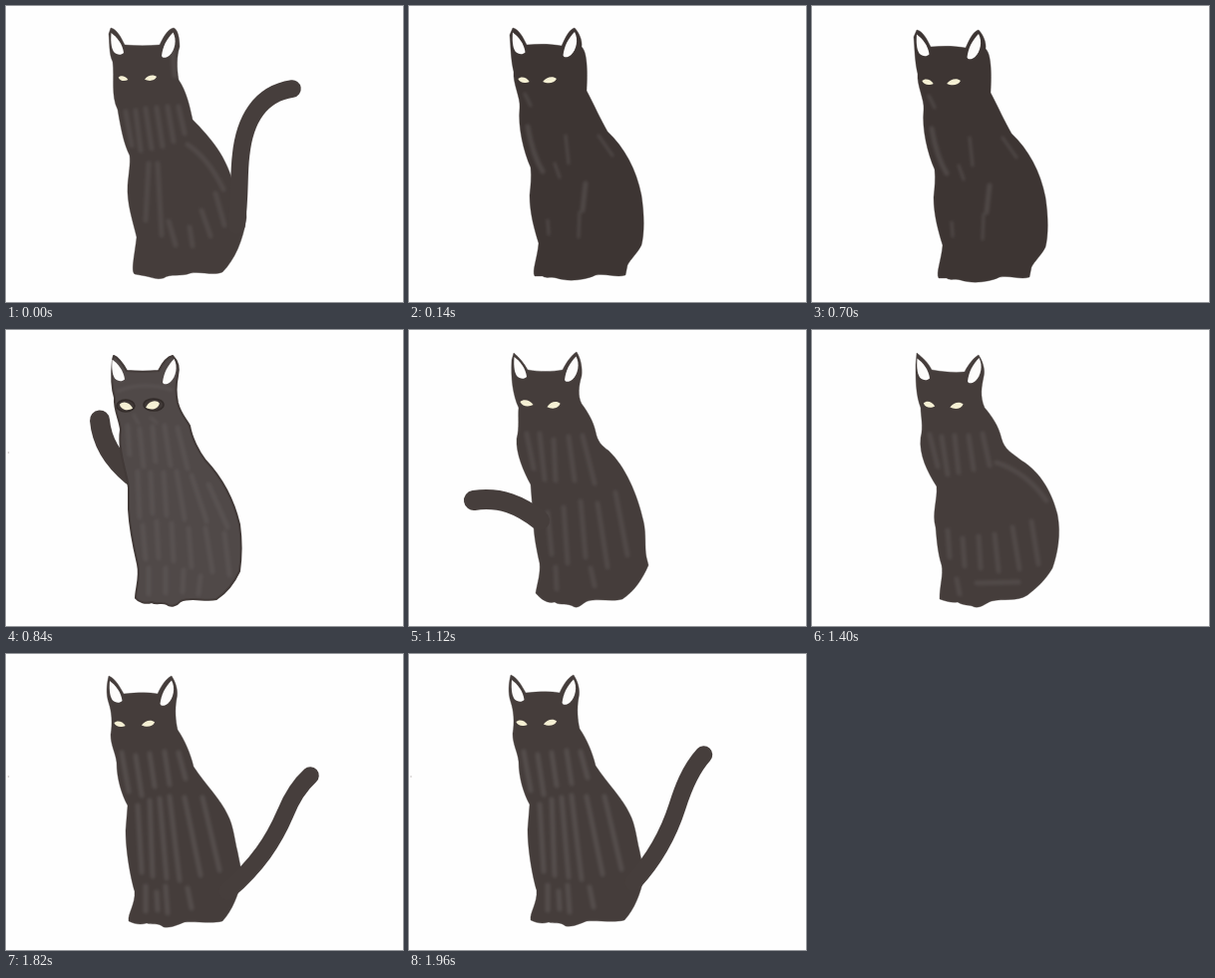
Recreate the animation shown at these times as an HTML page without scripts. Size 398 by 297 pixels, loop 2100 ms.

```html
<!DOCTYPE html>
<html lang="en">
<head>
<meta charset="utf-8">
<title>Black cat swinging its tail</title>
<style>
html, body { margin: 0; width: 100%; height: 100%; overflow: hidden; background: #fefefe; }
svg { display: block; width: 100vw; height: 100vh; }
.pose { --ink: #453d3b; --tone: .08; }
.cel {
  visibility: hidden;
  animation: show 2100ms step-end infinite;
  animation-delay: calc((var(--i) - 15) * 140ms);
}
@keyframes show {
  0% { visibility: visible; }
  6.666%, 100% { visibility: hidden; }
}
.body { fill: var(--ink); stroke: var(--ink); stroke-width: .4; stroke-linejoin: round; }
.tail { fill: none; stroke: #463e3c; stroke-width: 17.5; stroke-linecap: round; }
.wide { stroke-width: 20; }
.streaks { fill: none; stroke: #dcdcdf; stroke-width: 5; stroke-linecap: round; opacity: var(--tone); filter: blur(1.5px); }
.thin { stroke-width: 3; }
.ear { fill: #fdfcfb; }
.eye { fill: #f5f0d4; }
.dust { fill: #c4bebb; }
</style>
</head>
<body>
<svg viewBox="0 0 398 297">
<defs>
  <path id="eye" class="eye" d="M-6-1C-3-4 3-3 6 2C2 4-4 4-6-1Z"/>
  <g id="ears" class="ear">
    <path d="M105.500 27C111 31 117 38 118 47C115 50 111 49 108 46C105 41 105 34 105.500 27Z"/>
    <path d="M167.500 26.500C171.500 34 169.500 44 164 49.500C161 52 157 53 156 50C157 41 161 33 167.500 26.500Z"/>
  </g>
  <circle id="dust" class="dust" cx="2.5" cy="123" r=".8"/>

  <g id="sit" class="pose">
    <path class="body" d="M105 22C111 23 115 31 119 39C131 40 143 40 154 39C158 31 162 23 168 22C172 23 174 32 174 41C171 50 171 62 173 74C181 86 184 100 187 114C205 132 222 152 228 180C235 192 241 200 241 212C238 235 229 255 217 267C208 271 195 266 185 268C175 272 165 268 158 273C150 275 146 272 140 271L129 269C125 266 129 250 131 232C127 215 121 198 122 180C123 168 125 158 124 150C118 138 115 122 112 104C105 90 109 72 107 56C103 48 104 36 103 28Z"/>
    <path class="streaks" d="M120 106L126 140M130 105L135 145M140 103L146 143M151 102L157 141M162 101L168 136M173 101L179 128M182 139Q203 153 218 184M143 158L140 215M152 158L156 230M210 188L219 220M163 216L170 240M184 222L187 241M196 205L205 231M167 45L169 70"/>
    <use href="#ears"/>
    <use href="#eye" transform="translate(117.5 72.5) scale(.8 .8)"/>
    <use href="#eye" transform="translate(145 72) scale(-1 .9)"/>
  </g>

  <g id="still" class="pose" style="--ink:#3d3533;--tone:.11">
    <path class="body" d="M104 22C110 23 114 31 118 39C130 38 142 38 153 40C157 31 161 23 166 22C170 26 174 34 173 41C179 46 179 68 178 85C185 98 192 114 199 126C216 142 228 164 233 190C236 210 236 228 233 240C229 248 222 254 219 260L217 270C208 273 198 268 187 270C177 275 160 277 148 273C142 271 138 274 134 271L126 271C123 266 129 252 130 238C126 225 121 208 121 190C122 180 123 172 122 162C115 146 109 122 111 102C112 92 104 78 105 66C102 54 102 40 101 29Z"/>
    <path class="streaks" d="M119 121Q124 150 134 166M177 178L174 205"/>
    <path class="streaks thin" d="M116 88L122 100M157 130L160 158M146 158L151 172M171 207L170 232M139 215L140 229M190 130L204 150"/>
    <use href="#ears" x="-1.5" y="-.5"/>
    <use href="#eye" transform="translate(115 74) scale(.95)"/>
    <use href="#eye" transform="translate(141 74) scale(-1.15 1)"/>
  </g>

  <g id="beckon" class="pose" style="--ink:#504948;--tone:.06">
    <path class="body" style="stroke:#423a38;stroke-width:2" d="M108 26C113 28 117 34 121 41C132 42 142 42 153 41C157 33 162 27 167 26C172 31 174 38 172 46C170 56 170 64 172 73C175 85 181 90 184 96C186 108 193 122 200 131C216 148 228 170 234 195C236 210 236 228 234 242C228 255 220 264 211 270C200 273 186 267 175 272C171 277 165 278 161 275C156 272 152 276 146 273C140 275 133 273 130 269C130 260 135 248 132 235C128 218 124 198 123 180L123 158C120 140 112 120 115 100C114 90 108 80 109 68C105 55 106 40 107 30Z"/>
    <path class="streaks" d="M122 96L124 125M134 99L138 137M147 97L150 132M159 96L165 136M172 98L182 139M132 142L134 188M145 143L147 184M158 143L161 186M171 142L179 190M186 146L201 192M203 155L222 198M137 196L140 230M151 192L153 229M166 194L168 232M183 199L186 238M200 199L207 243M219 204L224 246M143 239L143 265M160 239L160 264M178 241L177 263M195 247L193 265"/>
    <path class="streaks thin" d="M112 61Q137 51 166 60M128 85L133 94M145 88L151 93"/>
    <g fill="#403937" stroke="#332c2a" stroke-width="1.5"><ellipse cx="120" cy="76" rx="9" ry="6"/><ellipse cx="148" cy="75" rx="10" ry="6"/></g>
    <use href="#ears" x="1" y="2.5"/>
    <use href="#eye" transform="translate(120.5 76) scale(1.1 1.3)"/>
    <use href="#eye" transform="translate(147 75) scale(-1.15 1.35)"/>
  </g>

  <g id="lean" class="pose">
    <path class="body" d="M105 23C111 28 115 33 119 40C131 42 143 42 154 40C158 32 163 25 168 22C172 28 174 38 173 46C170 56 169 66 173 74C179 82 185 92 187 102C189 112 193 116 200 121C217 137 229 165 235 192C238 205 236 218 238 228L240 236C234 250 226 262 214 270C204 273 190 269 179 272C174 274 171 279 166 278C158 273 152 277 146 273C139 275 132 270 127 264C129 253 132 244 131 234C128 221 125 205 125 195L122 155C115 142 107 124 108 109C111 98 109 86 110 78C104 65 102 48 103 30Z"/>
    <path class="streaks" d="M118 104L125 139M131 104L136 150M145 110L147 151M160 107L166 151M174 106L186 154M139 183L143 225M155 178L159 234M172 172L177 228M189 174L199 238M207 163L219 226M147 238L148 260M182 239L186 257"/>
    <use href="#ears"/>
    <use href="#eye" transform="translate(118 73) scale(1.1 1.05)"/>
    <use href="#eye" transform="translate(145 75) scale(-1.1 1.15)"/>
  </g>

  <g id="hunch" class="pose">
    <path class="body" d="M105 23C111 28 116 32 120 40C131 42 143 43 153 42C157 34 162 28 167 25C171 31 174 40 172 47C170 57 168 66 173 78C180 86 187 96 190 109C193 120 200 123 210 131C230 143 241 165 246 185C250 205 246 225 241 239C234 251 225 259 216 266C205 273 192 269 180 272C174 274 170 279 163 278C157 275 152 277 146 273C140 274 134 272 128 270C128 256 132 246 130 236C126 224 125 209 124 198C120 184 126 170 125 157C116 143 107 125 109 108C112 97 109 86 109 78C104 65 104 50 104 35Z"/>
    <path class="streaks" d="M118 105L126 137M130 107L136 145M143 106L147 143M157 106L162 140M171 104L178 136M185 133Q215 143 235 171M136 201L138 228M151 209L153 237M167 207L169 239M183 205L187 242M201 198L208 240M220 192L227 235M145 250L148 265M165 254L207 253"/>
    <use href="#ears" y="1.5"/>
    <use href="#eye" transform="translate(117.5 74.5) scale(.95 1)"/>
    <use href="#eye" transform="translate(145 75.5) scale(-1.1 1.05)"/>
  </g>

  <g id="curl" class="pose">
    <path class="body" d="M102 24C109 27 113 34 117 41C129 43 142 42 153 40C157 32 162 25 168 22C172 29 172 40 169 47C165 58 168 70 173 78C180 88 185 102 188 115C198 132 215 151 226 174L236 195L243 225C235 244 226 256 217 266C206 274 193 270 181 272C175 274 171 280 164 280C158 277 154 272 148 274C141 276 135 273 126 269C127 263 131 260 131 250L131 235C128 218 122 202 121 185C121 176 124 166 121 158C112 145 105 128 107 110C110 99 107 91 104 80C103 69 105 58 103 48C99 41 100 31 102 24Z"/>
    <path class="streaks" d="M116 99L121 145M130 96L135 139M145 94L149 129M160 94L166 130M175 101L181 129M132 157L138 209M145 145L151 188M160 140L169 182M179 143L190 175"/>
    <path class="streaks" style="stroke-width:10" d="M167 199L166 260M177 197L177 260M187 196L189 255M199 204L202 244"/>
    <use href="#ears" x="-1.5"/>
    <use href="#eye" transform="translate(115 76) scale(.95 1)"/>
    <use href="#eye" transform="translate(142 75) scale(-1.15 1.15)"/>
  </g>

  <g id="swing" class="pose" style="--tone:.1">
    <path class="body" d="M102 21C109 24 113 32 117 39C129 38 140 37 151 39C155 30 160 23 165 21C169 27 172 36 170 44C168 55 169 66 171 75C178 85 184 99 187 112C199 130 215 146 221 160C227 171 228 185 231 197L236 222C232 241 226 256 216 267C205 270 190 267 178 268C170 271 165 274 157 273C151 268 145 271 140 269C134 271 128 270 122 267C121 259 129 250 128 237C124 224 119 197 119 176L121 151C115 140 110 124 110 108C109 98 104 91 104 80C106 68 105 57 102 48C99 39 100 29 102 21Z"/>
    <path class="streaks" d="M115 98L122 137M129 101L135 141M143 99L148 132M158 97L163 130M172 98L179 124M131 151L135 218M143 146L146 222M153 144L160 224M163 142L173 226M178 143L194 221M196 143L213 216M139 232L139 257M150 238L151 256M159 232L161 259M181 234L185 254"/>
    <use href="#ears" x="-2.5" y="-1"/>
    <use href="#eye" transform="translate(113 69) scale(.95 .95)" style="fill:#e9e0a8"/>
    <use href="#eye" transform="translate(141.5 68.500) scale(-1.1 1)" style="fill:#e9e0a8"/>
  </g>
</defs>

<g class="cel" style="--i:0"><use href="#sit"/><path class="tail" d="M231 220C235 190 233 170 235.500 150C239 115 254 88 287 83"/></g>
<g class="cel" style="--i:1"><use href="#still"/></g>
<g class="cel" style="--i:2"><use href="#still" x=".5"/></g>
<g class="cel" style="--i:3"><use href="#still"/></g>
<g class="cel" style="--i:4"><use href="#still" y="1"/></g>
<g class="cel" style="--i:5"><use href="#still" x="1" y="2"/></g>
<g class="cel" style="--i:6"><path class="tail wide" d="M126 146C109 132 96 114 94 90.500"/><use href="#beckon"/><use href="#dust"/></g>
<g class="cel" style="--i:7"><path class="tail wide" d="M130 170C112 160 96 144 87 124"/><use href="#beckon" x=".5"/><use href="#dust"/></g>
<g class="cel" style="--i:8"><use href="#lean"/><path class="tail wide" d="M131 191C112 176 92 167 65 171"/></g>
<g class="cel" style="--i:9"><use href="#lean" x="1"/><path class="tail wide" d="M135 210C122 206 108 209 96 219"/><use href="#dust"/></g>
<g class="cel" style="--i:10"><use href="#hunch"/></g>
<g class="cel" style="--i:11"><use href="#hunch"/><path class="tail" d="M220 248C244 220 255 190 247 162C242 147 233 136 221 129"/><use href="#dust"/></g>
<g class="cel" style="--i:12"><use href="#curl"/><path class="tail" d="M222 246C250 207 263 172 258 145C252 115 231 89 203 81"/><use href="#dust" x="-.5"/></g>
<g class="cel" style="--i:13"><use href="#swing" x="1" y="1"/><path class="tail" d="M222 238C252 212 268 188 280 160C286 145 294 132 305 122"/><use href="#dust"/></g>
<g class="cel" style="--i:14"><use href="#swing"/><path class="tail" d="M225 229C249 203 261 178 269 153C274 137 281 117 295.500 101"/><use href="#dust" x="-.5"/></g>
</svg>
</body>
</html>
```
